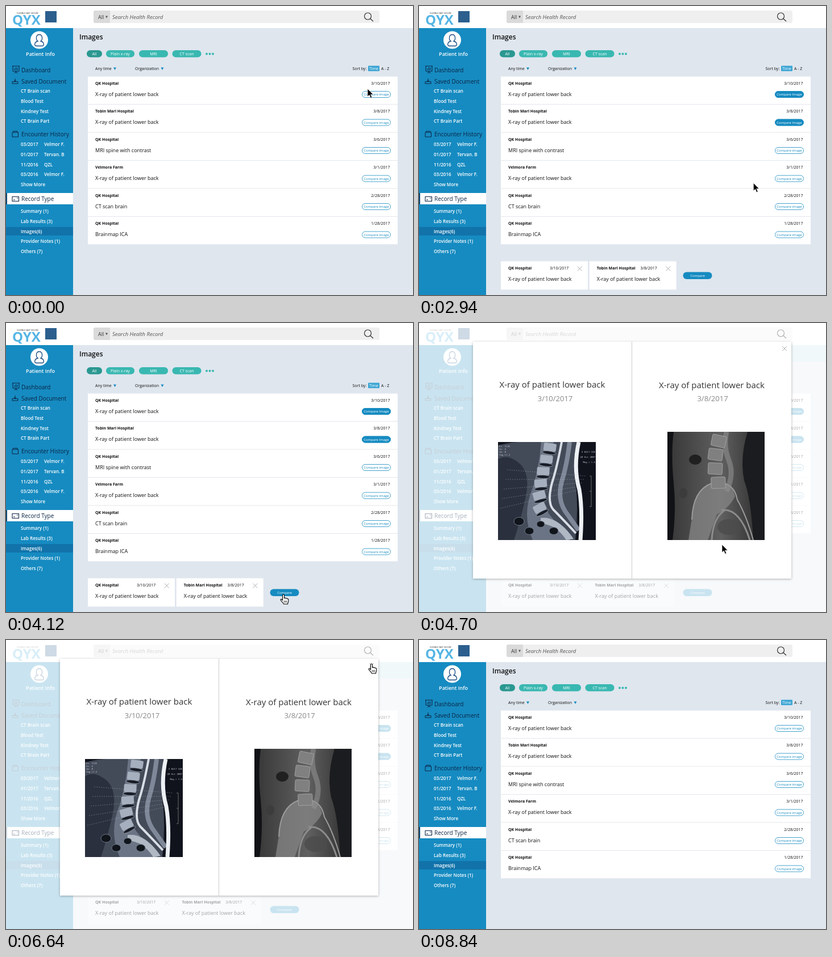
Recreate the animation shown at these times as an HTML page. Size 716 by 510 pixels, loop 8.86 s.

```html
<!DOCTYPE html>
<html lang="en">
<head>
<meta charset="utf-8">
<title>Health record image comparison</title>
<style>
html, body { margin: 0; width: 100%; height: 100%; overflow: hidden; background: #fff }
svg { display: block; width: 716px; height: 510px; font-family: "Open Sans", "Noto Sans", sans-serif; cursor: default }
</style>
</head>
<body>
<svg id="stage" viewBox="0 0 716 510"></svg>
<script>
const BLUE = '#168bc1', NAVY = '#0b2444', TEAL = '#39b8b1', PAGE = '#dfe6ee';
const LOOP = 8860;

const text = (x, y, s, size, fill = '#111', extra = '') =>
  `<text x="${x}" y="${y}" font-size="${size}" fill="${fill}" ${extra}>${s}</text>`;
const rect = (x, y, w, h, fill, extra = '') =>
  `<rect x="${x}" y="${y}" width="${w}" height="${h}" fill="${fill}" ${extra}/>`;
const line = (d, stroke, width = 1, extra = '') =>
  `<path d="${d}" fill="none" stroke="${stroke}" stroke-width="${width}" ${extra}/>`;
const shape = (d, fill, extra = '') => `<path d="${d}" fill="${fill}" ${extra}/>`;
const group = (id, body, extra = '') => `<g id="${id}" ${extra}>${body}</g>`;
const cross = (x, y, r = 4) => line(`M${x - r} ${y - r}l${2 * r} ${2 * r}m0 ${-2 * r}l${-2 * r} ${2 * r}`, '#999', .8);
const MID = ' text-anchor="middle"', END = ' text-anchor="end"';
const BOLD = ' font-weight="700"', SEMI = ' font-weight="600"';

const XRAY = 'X-ray of patient lower back';
const records = [
  ['QK Hospital', XRAY, '3/10/2017'],
  ['Tobin Marl Hospital', XRAY, '3/8/2017'],
  ['QK Hospital', 'MRI spine with contrast', '3/6/2017'],
  ['Velmora Farm', XRAY, '3/1/2017'],
  ['QK Hospital', 'CT scan brain', '2/28/2017'],
  ['QK Hospital', 'Brainmap ICA', '1/28/2017']
];

function header() {
  return rect(0, 0, 716, 39, '#fff')
    + text(19, 13.5, 'FLEXIBLE FAST SECURE', 3.9, '#333', 'font-style="italic"')
    + text(11, 33, 'QYX', 24, '#55b5e4', BOLD)
    + rect(69, 9, 20, 20, '#2c5f8e')
    + rect(154, 8, 503, 22, '#efefef', 'rx="3"')
    + shape('M157 8h26v22h-26q-3 0-3-3V11q0-3 3-3z', '#dadada')
    + text(162, 22.5, 'All', 9, '#333')
    + shape('M175 17.500h4l-2 4z', '#555')
    + text(187, 23, 'Search Health Record', 9.5, '#555', 'font-style="italic"');
}

function sidebar() {
  const item = (x, y, s) => text(x, y, s, 8, '#fff', SEMI);
  const head = (y, s) => text(27, y, s, 10, NAVY);
  const visits = [['03/2017', 'Velmor F.'], ['01/2017', 'Tervan. B'], ['11/2016', 'QZL'], ['03/2016', 'Velmor F.']];
  return rect(0, 39, 118, 471, BLUE)
    + '<circle cx="58.500" cy="60" r="15.500" fill="#fff"/>'
    + line('M58.500 50.500c-6.500 0-6 9.500-2.500 11.500-6 1.500-7 8-3 8.500h11c4-.5 3-7-3-8.500 3.500-2 4-11.500-2.500-11.500z', '#174a80', 1.3)
    + text(60.5, 88, 'Patient Info', 9, '#fff', SEMI + MID)
    + head(117, 'Dashboard') + head(137, 'Saved Document') + head(230, 'Encounter History')
    + line('M11 106h13M12 106v9h11v-9M15 113v-3m2.500 3v-5m2.500 5v-4M17.500 115v3m-3 1 3-3 3 3', NAVY)
    + line('M11 133.500v3.500h10v-3.500zM16 128v5m-2-2 2 2 2-2', NAVY)
    + line('M11 223h10.500v8H11zM12.500 223v-2h7.500v2', NAVY)
    + ['CT Brain scan', 'Blood Test', 'Kindney Test', 'CT Brain Part'].map((s, i) => item(26, 153 + 17.8 * i, s)).join('')
    + visits.map(([d, s], i) => item(26, 247 + 17.8 * i, d) + item(67, 247 + 17.8 * i, s)).join('')
    + item(26, 318, 'Show More')
    + rect(0, 330, 2, 20, '#0d4773') + rect(2, 330, 116, 20, '#fff')
    + rect(0, 390, 118, 15, '#1173aa')
    + ['Summary (1)', 'Lab Results (3)', 'Images(6)', 'Provider Notes (1)', 'Others (7)']
      .map((s, i) => item(26, 365 + 17.8 * i, s)).join('');
}

function filters() {
  const pill = (x, w, s, fill = TEAL) =>
    rect(x, 78, w, 12.5, fill, 'rx="6.250"') + text(x + w / 2, 87, s, 7, '#fff', MID);
  return text(129, 58.5, 'Images', 12, '#111', SEMI)
    + pill(142, 27, 'All', '#2a9891') + pill(176, 50, 'Plain x-ray') + pill(234, 51, 'MRI') + pill(292.5, 51, 'CT scan')
    + [353, 358.5, 364].map(x => `<circle cx="${x}" cy="84.500" r="2" fill="${TEAL}"/>`).join('')
    + text(157, 113, 'Any time', 7) + text(227, 113, 'Organization', 7)
    + shape('M189 108.500h5l-2.500 4.500zM272.500 108.500h5l-2.500 4.500z', BLUE)
    + text(609.5, 113, 'Sort by:', 7) + rect(637, 105.5, 20, 9.5, '#3ba5d4', 'rx="1"')
    + text(647, 113, 'Time', 7, '#fff', MID) + text(660, 113, 'A - Z', 7);
}

const rowTop = i => 124 + 49.5 * i;

function list() {
  return rect(144, 124.5, 545, 296, '#fff') + records.map((_, i) => {
    const y = rowTop(i);
    const button = (label, fill, ink) => rect(626.5, y + 26.5, 50, 11, fill, `rx="5.500" stroke="${BLUE}" stroke-width=".8"`)
      + text(651.5, y + 34.2, label, 6, ink, MID);
    return (i ? rect(144, y - .5, 545, 1, '#e3e7ec') : '') + button('Compare image', '#fff', BLUE)
      + (i < 2 ? group('picked' + i, button('Compare Image', BLUE, '#fff')) : '');
  }).join('');
}

function listText() {
  return records.map(([place, what, date], i) => {
    const y = rowTop(i);
    return text(157, y + 14.5, place, 7, '#111', BOLD) + text(157, y + 34.5, what, 9)
      + text(675.5, y + 14.5, date, 7, '#111', END);
  }).join('') + text(27, 344, 'Record Type', 10, NAVY)
    + line('M11 336.500h11.500v8H11zM13 342h3m3-3h2', NAVY, 1.1)
    + '<circle cx="636.500" cy="18" r="6" fill="none" stroke="#333" stroke-width="1.200"/>'
    + line('M641 22.500l5 4.500', '#333', 1.3);
}

const card = (i, x, dateX) => group('card' + i, rect(x, 450.5, 153, 50, '#fff')
  + text(x + 13, 465, records[i][0], 7, '#111', BOLD) + text(dateX, 465, records[i][2], 7)
  + cross(x + 138.7, 463.5) + text(x + 13, 485.3, XRAY, 9));

// Soft sagittal scan with a dark field
function scanA() {
  let s = rect(139, 210, 172, 173, '#10131b')
    + shape('M139 216q30-8 62-6h76q-8 48 0 86 3 45-2 87H139z', '#434a58')
    + shape('M139 240q18-10 38 8t10 62-20 73h-28z', '#2a303d')
    + shape('M215 210h22q-5 50-17 86-2 22 8 40l38 47h-66q-20-45 0-92 12-40 15-81z', '#6b7484')
    + line('M251 210q-9 48-17 72-9 34 2 47 14 14 40 42', '#d9dee6', 4)
    + line('M265 210q-5 42-14 70-8 30 6 52l24 34', '#7f8898', 8)
    + line('M281 210q-10 46 1 84 6 34 2 89', '#eef1f5', 7);
  for (let i = 0; i < 6; i++) {
    const u = i / 5, x = 229 - 30 * u + 18 * u * u * u, y = 229 + 106 * u;
    s += `<g transform="translate(${x} ${y}) rotate(${8 - 36 * u * u})">`
      + rect(-11, -17, 22, 14, '#a6afbd', 'rx="2"')
      + '<ellipse rx="12" ry="3" fill="#171c26" stroke="#aab3c0" stroke-width=".7"/></g>';
  }
  s += shape('M214 344q30-4 58 37l-13 2q-18-28-45-29z', '#b0b8c4')
    + [[214, 355, 7], [194, 367, 8], [237, 367, 8], [176, 350, 9]].map(([x, y, r]) =>
      `<ellipse cx="${x}" cy="${y}" rx="${r}" ry="${r * .8}" fill="#10141b" stroke="#727b8a"/>`).join('');
  s = `<g filter="url(#soft)">${s}</g>`;
  for (let i = 0; i < 5; i++)
    s += line(`M${143 + i * 3} ${327 - i * 17}L${282 + i * 3} ${294 - i * 6}`, '#b7c1cf', .4, 'stroke-dasharray="2 2"');
  const mono = 'font-family="Noto Sans Mono, monospace"';
  return s + line('M303 270v54m-3-54h3m-3 27h3m-3 27h3', '#aaa', .6)
    + ['Ex: 3126', 'Se: 4', 'Im: 8', 'Sag L1.2'].map((t, i) => text(141, 219 + i * 5, t, 4, '#ccd', mono)).join('')
    + ['X 0217 CDR', '20 Oct 2007', 'Mag = 1.4'].map((t, i) => text(310, 229 + i * 9, t, 4, '#ccd', mono + END)).join('');
}

// Soft lateral film with a grey field
function scanB() {
  let s = rect(437, 192, 171, 191, 'url(#film)')
    + shape('M437 192h11q-5 40 0 90t-2 101h-9z', '#111216')
    + shape('M578 192h30v191h-20q-4-75-16-105-8-40 6-86z', '#1b1c1f')
    + shape('M480 345q2-54 38-64 32-4 38 25-10 20-32 32l-16 45h-34z', '#868686', 'opacity=".75"')
    + line('M480 347q2-55 38-65 36-4 42 30 16 28 28 71', '#9c9c9c', 2)
    + line('M532 330q32-4 50 53M515 383q2-38 22-52', '#8c8c8c', 3)
    + line('M541 192q-6 25 4 50t-4 55', '#8f8f8f', 9, 'opacity=".6"');
  for (let i = 0; i < 4; i++) {
    const u = i / 3, y = 197 + i * 25;
    s += rect(515 - 7 * Math.sin(u * 3), y, 25, 20, '#808080',
      `rx="2" stroke="#aaa" stroke-width=".8" transform="rotate(${12 - 14 * u} 522 ${y + 10})"`);
  }
  s += '<ellipse cx="486" cy="241" rx="11" ry="9" fill="#202020"/><ellipse cx="465" cy="300" rx="7" ry="9" fill="#3c3c3c"/>'
    + '<ellipse cx="545" cy="360" rx="20" ry="14" fill="#4c4c4c" opacity=".8"/>';
  return `<g filter="url(#soft)">${s}</g>`;
}

function modal() {
  const title = (x, y, i) => text(x, y, XRAY, 15, '#333', MID) + text(x + 3.5 * !i + 1.5, 138, records[i][2], 13, '#888', MID);
  return rect(95, 33, 560, 418, '#fff', 'filter="url(#shadow)"')
    + rect(374, 33, 1, 418, '#ccc') + cross(643, 45)
    + title(234.5, 114, 0) + title(515, 114.7, 1)
    + `<g clip-path="url(#left)">${scanA()}</g><g clip-path="url(#right)">${scanB()}</g>`;
}

const $ = id => document.getElementById(id);
$('stage').innerHTML = `<defs>
    <filter id="shadow"><feDropShadow dx="0" dy="1" stdDeviation="2" flood-opacity=".3"/></filter>
    <filter id="soft"><feGaussianBlur stdDeviation=".7"/></filter>
    <linearGradient id="film"><stop offset="0" stop-color="#363636"/><stop offset=".55" stop-color="#606060"/><stop offset="1" stop-color="#2a2a2a"/></linearGradient>
    <clipPath id="left">${rect(139, 210, 172, 173, '#000')}</clipPath>
    <clipPath id="right">${rect(437, 192, 171, 191, '#000')}</clipPath>
  </defs>`
  + rect(0, 0, 716, 510, PAGE) + header() + sidebar() + filters() + list()
  + group('compare', rect(464.5, 469.5, 51, 12.5, BLUE, 'rx="6.250"') + text(490, 478, 'Compare', 6, '#fff', MID))
  + group('veil', rect(0, 0, 716, 510, '#fff', 'opacity=".77"'))
  + group('ink', listText() + card(0, 144, 230) + card(1, 299.7, 389.5))
  + group('modal', rect(118, 39, 598, 29, '#f0f8fa') + rect(118, 68, 598, 56, '#f8f9fb')
    + rect(655, 371, 35, 51, '#f8f9fb') + modal())
  + group('arrow', shape('M0 0V14l3.200-3 2.400 5.400 2.300-1-2.400-5.200H10z', '#000', 'stroke="#fff" stroke-width=".7"'))
  + group('hand', shape('M-1.500 1.500a1.500 1.500 0 0 1 3 0V6.500c1-.8 2.500-.4 2.800.5 1-.6 2.200-.2 2.500.7 1-.4 2 .2 2 1.300V12c0 2-1.300 2.500-1.300 5H.5C0 14.500-3.500 13-4.800 9.800c-.5-1.300 1-2 2-1l1.300 1.400z', '#fff', 'stroke="#000" stroke-width="1.100"')
    + line('M1.300 11v3.500m2.200-3.500v3.500m2.200-3.500v3.500', '#000', .8));

// Screens switch hard on each click
const PICKS = [1100, 2420], OPEN = 4260, CLOSE = 6880;

// Pointer path: time, x, y
const path = [
  [0, 636, 146], [820, 636, 146], [980, 643, 152], [1320, 643, 152], [1640, 643, 201],
  [2680, 643, 201], [3300, 500, 492], [3600, 488, 479], [4500, 488, 479], [4700, 533, 391],
  [5300, 548, 355], [5620, 641, 57], [5760, 643, 42], [CLOSE, 643, 42], [CLOSE + 20, 643, 47],
  [7400, 643, 47], [7640, 722, 60], [LOOP, 722, 60]
];
const hands = [[920, 1400], [1560, 2740], [3520, OPEN], [5720, CLOSE]];

const ease = (t, a, b) => {
  const u = Math.min(1, Math.max(0, (t - a) / (b - a)));
  return u * u * (3 - 2 * u);
};
const show = (id, on) => $(id).setAttribute('opacity', +on);
const move = (id, x, y) => $(id).setAttribute('transform', `translate(${x} ${y})`);

function draw(t) {
  const open = t >= OPEN && t < CLOSE;
  PICKS.forEach((start, i) => {
    const picked = t >= start && t < CLOSE;
    show('picked' + i, picked);
    show('card' + i, picked);
    move('card' + i, -3.3 * i * open, 0);
  });
  show('compare', t >= PICKS[1] && t < CLOSE);
  show('veil', open);
  show('modal', open);
  show('ink', open ? .36 : 1);

  const k = path.findIndex(p => p[0] > t), [t0, x0, y0] = path[k - 1], [t1, x1, y1] = path[k];
  const u = ease(t, t0, t1), hand = hands.some(([a, b]) => t >= a && t < b);
  show('hand', hand);
  show('arrow', !hand);
  for (const id of ['hand', 'arrow']) move(id, x0 + (x1 - x0) * u, y0 + (y1 - y0) * u);
}

const begin = performance.now();
function tick() {
  draw((performance.now() - begin) % LOOP);
  requestAnimationFrame(tick);
}
tick();
</script>
</body>
</html>
```
